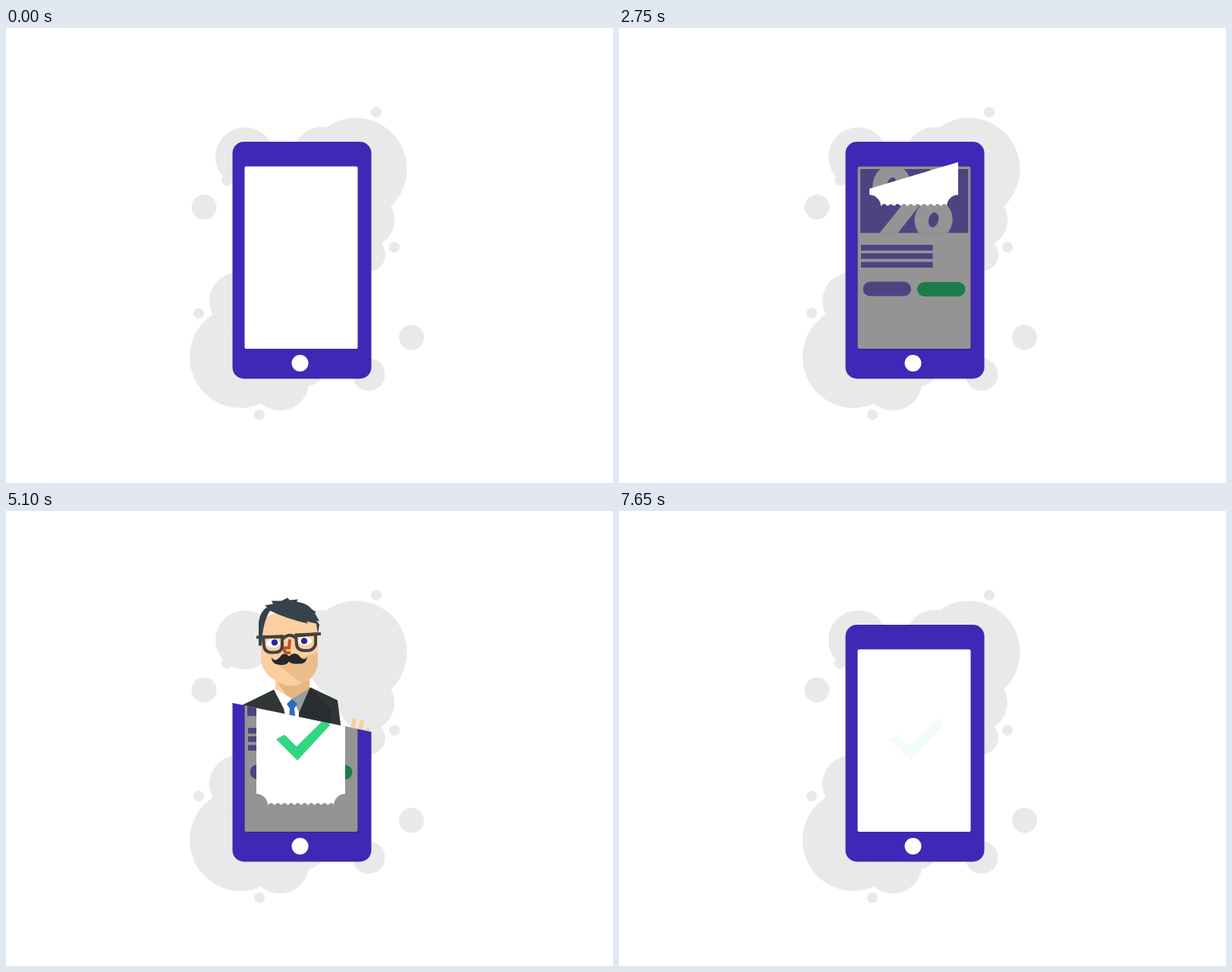
An HTML page that plays this animation: 800x600 px, repeating every 7750 ms.

```html
<!DOCTYPE html>
<html lang="en">
<head>
<meta charset="utf-8">
<title>Mobile coupon</title>
<style>
  html, body { margin: 0; width: 100%; height: 100%; overflow: hidden; background: #fff; }
  svg { display: block; }
</style>
</head>
<body>
<svg width="800" height="600" viewBox="0 0 800 600">
  <defs>
    <clipPath id="below"><polygon id="cutLow" points="290,251.3 490,292.9 490,660 290,660"/></clipPath>
    <clipPath id="above"><polygon id="cutHigh" points="200,232.6 600,315.7 600,-50 200,-50"/></clipPath>
    <clipPath id="slot"><polygon points="300,221 490,164 490,430 300,430"/></clipPath>
    <clipPath id="banner"><rect x="318" y="186" width="142.5" height="84.5"/></clipPath>
    <mask id="punch" maskUnits="userSpaceOnUse" x="325" y="215" width="130" height="180">
      <rect x="330" y="222.5" width="117" height="165" fill="#fff"/>
      <g id="corners"></g>
      <path d="M349.4 222H433M349.4 388H433" stroke="#000" stroke-width="6" stroke-linecap="round" stroke-dasharray="0 8.8"/>
    </mask>
  </defs>

  <g id="clouds" fill="#e9e9e9"></g>

  <g clip-path="url(#below)">
    <g id="phone">
      <rect x="298.5" y="150" width="183" height="312.5" rx="15" fill="#3f28b5"/>
      <rect x="314.5" y="182.5" width="149" height="240.5" rx="2" fill="#fff"/>
      <circle cx="387.5" cy="442" r="11" fill="#fff"/>
    </g>
    <g fill="#8673dd">
      <g id="image" clip-path="url(#banner)">
        <rect x="318" y="186" width="142.5" height="84.5"/>
        <path d="M343 271L415 181L431 190L367 271Z" fill="#fff"/>
        <g id="rings"></g>
      </g>
      <rect id="line1" x="319" y="286" width="94.5" height="7.5"/>
      <rect id="line2" x="319" y="297" width="94.5" height="7.5"/>
      <rect id="line3" x="319" y="308.5" width="94.5" height="7.5"/>
      <rect id="later" x="321.5" y="334.5" width="63.5" height="19" rx="9.5"/>
      <rect id="accept" x="393" y="335" width="63.5" height="19" rx="9.5" fill="#30d780"/>
    </g>
    <rect id="dim" x="314" y="182" width="150" height="241.5" rx="2"/>
    <g clip-path="url(#slot)">
      <g id="ticket">
        <rect x="330" y="222.5" width="117" height="165" fill="#fff" mask="url(#punch)"/>
        <polygon id="check" points="356,301 367,295 383,310.5 420.5,273.5 427,282.5 384,329" fill="#30d780"/>
      </g>
    </g>
  </g>

  <g clip-path="url(#above)">
    <g id="man">
      <g id="arm">
        <path d="M437 260L440 251L470 262L466 270Z" fill="#fff"/>
        <path d="M400 239L437 256L469 267L462 292L440 420H390Z" fill="#242626"/>
        <g fill="none" stroke="#fbcf9f" stroke-linecap="round" stroke-linejoin="round">
          <path d="M455 236L459 208M463 238L469 211M469 242L477 221" stroke-width="5.6"/>
          <path d="M455 228Q445 218 437 225Q432 231 436 240Q443 246 451 238" stroke-width="4.8"/>
        </g>
        <path d="M452 228L474 234Q473 251 468 261L442 253Q434 244 435 239L447 242Z" fill="#fbcf9f"/>
      </g>
      <path d="M352 238L402 236L412 420H350Z" fill="#fff"/>
      <path d="M400 238L377 252L388 275L402 262Z" fill="#949ea1"/>
      <path d="M353 241L290 272V440H400L366 266Z" fill="#303538"/>
      <path d="M401 238L386 272L392 440H460L437 255Z" fill="#303538"/>
      <path d="M401 238L386 272L392 440H420L428 268Z" fill="#292d2f"/>
      <path d="M377 253L384 260L380 266L386 320H370L374 266L370 260Z" fill="#2d6ac4"/>
      <path d="M355 225V240L377 253L400 239V222Z" fill="#fbcf9f"/>
      <path d="M356 229L369 248L377 253L400 239V222Z" fill="#e6b582"/>
      <path d="M336 150Q370 125 411 152V207Q408 226 390 233Q380 238 368 235Q338 225 336 201Z" fill="#fbcf9f"/>
      <path d="M411 192V207Q408 226 390 233L358 208Z" fill="#ecbd8c"/>
      <path d="M333 183V152Q335 138 344 132L341 130L352 128L350 124L363 124L371 120L374 123L385 122L383 125Q397 127 403 135L409 139L407 140L413 151L409 150L413 155L411 168L409 154L396 151L398 154Q371 148 348 137Q338 152 337 183Z" fill="#354249"/>
      <g fill="#fff"><ellipse cx="352" cy="180" rx="9" ry="5.5"/><ellipse cx="394" cy="177" rx="9" ry="5.5"/></g>
      <g fill="#24289b"><circle cx="354" cy="179" r="4.2"/><circle cx="393" cy="177" r="4.2"/></g>
      <path d="M374 175L373 186H367V190Q369 194 375 192" fill="none" stroke="#bb561c" stroke-width="4"/>
      <g fill="none" stroke="#414244" stroke-width="4">
        <path d="M330 172L364 171M381 169L415 167.5M364 175Q373 165 382 173"/>
        <path d="M339 172L364 171V184Q363 192 354 192H348Q341 191 340 184Z"/>
        <path d="M382 170L408 168V181Q406 189 398 189.500H392Q384 189 383 182Z"/>
      </g>
      <path d="M350 198Q354 206 361 198Q366 190 373 197Q381 190 387 197Q392 204 397 198Q396 207 387 207Q377 208 373 204Q369 210 359 208Q350 207 350 198Z" fill="#25282a"/>
    </g>
  </g>

  <g id="fresh">
    <rect width="800" height="600" fill="#fff"/>
    <use href="#clouds"/>
    <use href="#phone"/>
  </g>
  <use id="ghost" href="#check"/>
</svg>
<script>
const LOOP = 7750, STEP = 50;
const $ = id => document.getElementById(id);
const clamp = v => Math.min(1, Math.max(0, v));
const span = (t, start, length) => clamp((t - start) / length);
const fade = (id, v) => $(id).setAttribute("opacity", v);
const move = (id, x, y, extra = "") => $(id).setAttribute("transform", `translate(${x} ${y}) ${extra}`);
const circle = (x, y, r) => `<circle cx="${x}" cy="${y}" r="${r}"/>`;

// What is left of the way; dips below zero for an overshoot.
const left = (u, c = 1.70158) => (1 - u) ** 2 * ((c + 1) * (1 - u) - c);

$("clouds").innerHTML = [
  [315, 170, 39], [291, 201, 7], [261, 236, 16.5], [461, 186, 67.5], [417, 171, 40.5],
  [475, 253, 37], [478, 299, 22], [512, 289, 7], [488, 111, 7], [309, 434, 67],
  [306, 360, 38], [254, 376, 7], [361, 466, 38.5], [397, 451, 21], [478, 457, 21.5],
  [534.5, 408, 16.5], [334, 510, 7]
].map(c => circle(...c)).join("");

$("corners").innerHTML = [330, 447].map(x => [222, 388].map(y => circle(x, y, 15)).join("")).join("");

$("rings").innerHTML = [[359.5, 207], [414.5, 253]].map(([x, y]) =>
  `<g transform="translate(${x} ${y}) rotate(12)">
    <ellipse rx="25" ry="26.500" fill="#fff"/><ellipse rx="6.5" ry="10"/></g>`).join("");

function rise(id, t, start) {
  const u = span(t, start, 550);
  move(id, 0, 155 * left(u ** 1.75));
  fade(id, clamp(u * 2.65));
}

function slide(id, t, start, x, y) {
  const u = span(t, start, 450), k = left(u);
  move(id, x * k, y * k);
  fade(id, clamp(u * 2.5));
}

function draw(t) {
  rise("line1", t, 45);
  rise("image", t, 131);
  rise("line2", t, 171);
  rise("line3", t, 254);
  slide("later", t, 820, 0, 62);
  slide("accept", t, 1050, 60, -63);

  fade("dim", 0.42 * span(t, 2450, 150));
  const drop = span(t, 2750, 650);
  const swing = 4.2 * Math.sin(2 * Math.PI * drop) * (1 - drop);
  move("ticket", 0, -153 * left(drop, 1.2), `rotate(${swing} 388.5 222)`);
  fade("ticket", t < 2750 ? 0 : 1);

  const open = span(t, 4400, 550);
  const cut = t < 4400 ? -170 : -133 * (1 + Math.cos(Math.PI * open)) / 2;
  move("cutLow", 0, cut);
  move("cutHigh", 0, cut);
  move("man", 0, 175 * left(span(t, 4650, 750), 1));
  move("arm", 0, 95 * left(span(t, 5050, 800), 1));
  fade("man", t < 4450 ? 0 : 1);

  fade("fresh", span(t, 7300, 350));
  fade("ghost", t < 7350 ? 0 : 1 - span(t, 7300, 375));
}

const begin = performance.now();
function tick() {
  const t = (performance.now() - begin) % LOOP;
  draw(Math.floor(t / STEP) * STEP);
  requestAnimationFrame(tick);
}
tick();
</script>
</body>
</html>
```
